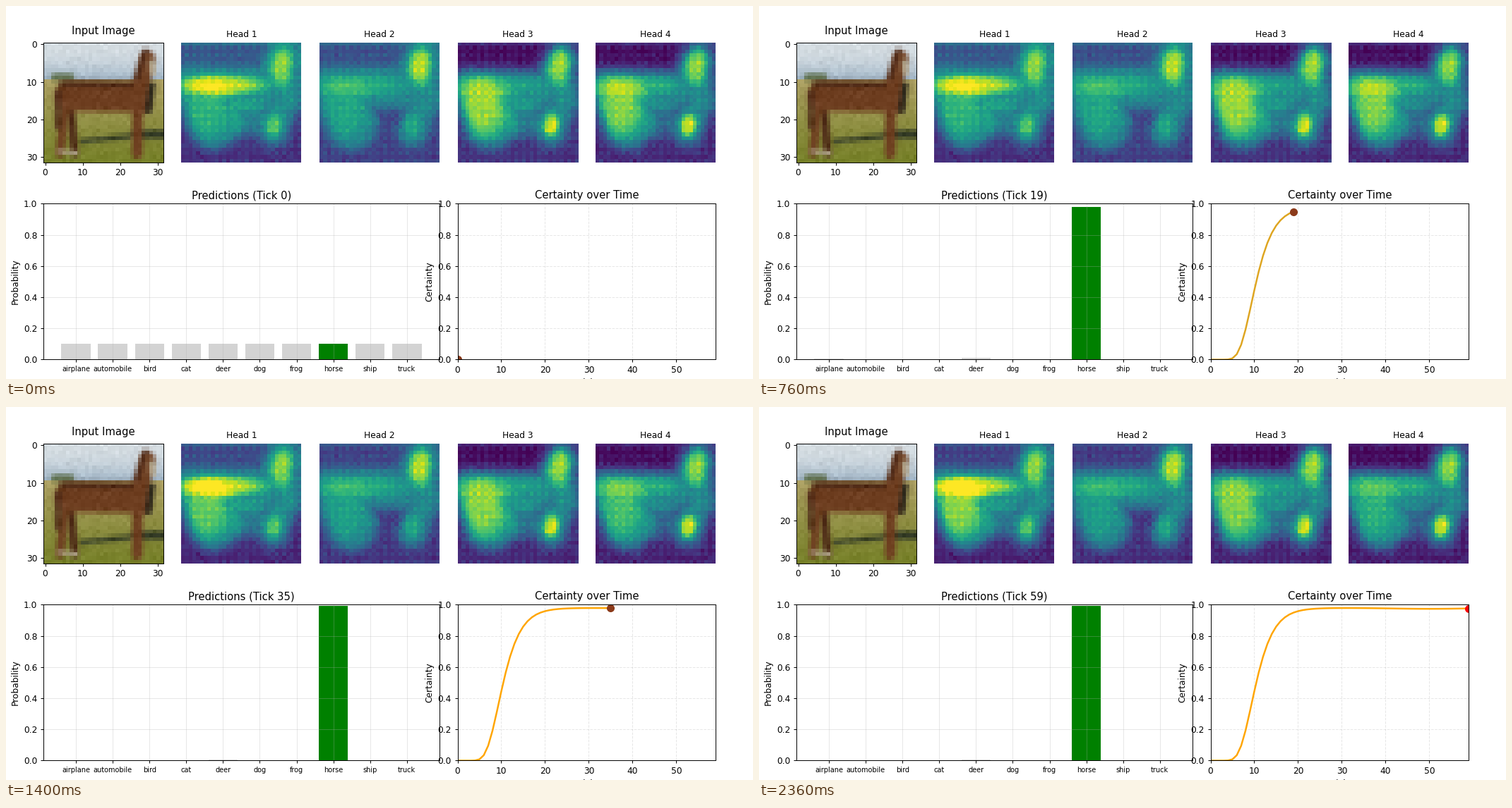
These frames come from a looping animation (1058x529 px, 2400 ms). A matplotlib script:

```python
import numpy as np
import matplotlib.pyplot as plt
from matplotlib.animation import FuncAnimation

TICKS = 60
N = 32
K = 23 / 24  # keeps type and line sizes right at 92 dpi

plt.rcParams.update({
    "font.family": "DejaVu Sans", "font.size": 10 * K,
    "axes.titlesize": 12 * K, "axes.titlepad": 6 * K, "axes.labelpad": 4 * K,
    "axes.linewidth": 0.8 * K, "grid.linewidth": 0.8 * K,
    **{f"{a}tick.major.{p}": v * K for a in "xy"
       for p, v in (("size", 3.5), ("pad", 3.5), ("width", 0.8))},
})

rows, cols = np.mgrid[0:N, 0:N].astype(float)


def dist(x0, y0, x1, y1, r):
    """Signed distance from every cell to a capsule."""
    dx, dy = x1 - x0, y1 - y0
    t = ((cols - x0) * dx + (rows - y0) * dy) / (dx * dx + dy * dy)
    t = np.clip(t, 0, 1)
    return np.hypot(cols - x0 - t * dx, rows - y0 - t * dy) - r


def soft(d, s):
    return 1 / (1 + np.exp(np.clip(d / s, -40, 40)))


def lobe(x, y, sx, sy):
    """Flat-topped bump."""
    return np.exp(-(((cols - x) / sx) ** 2 + ((rows - y) / sy) ** 2) ** 2)


# ---- input picture -------------------------------------------------------

def make_picture():
    brown, dark, black = (110, 62, 32), (76, 40, 22), (40, 36, 26)
    pale, shade = (178, 168, 142), (48, 56, 36)

    sky = np.array((212, 220, 225)) - rows[..., None] ** 2 * (0.6, 0.45, 0.3)
    depth = (rows[..., None] - 10) / 21
    field = np.array((172, 160, 98)) - depth * (54, 32, 58)
    img = np.where(rows[..., None] < 9.5, sky, field)

    def paint(color, *capsule, s=0.3):
        nonlocal img
        m = soft(dist(*capsule), s)[..., None]
        img = img * (1 - m) + np.array(color) * m

    paint((86, 104, 66), 2.5, 8.8, 6.5, 8.8, 0.9)
    paint(shade, 10, 25.8, 22, 24.6, 0.6)
    paint(shade, 24, 24, 31, 24, 1.1)
    paint(dark, 6.8, 18, 7.8, 29, 1.0)
    paint(brown, 5.2, 17, 3.9, 29, 1.1)
    paint(brown, 24.5, 15, 24.4, 29, 1.4)
    paint(brown, 6.5, 14, 23.5, 14.2, 3.9)
    paint(brown, 25, 12, 25.5, 16, 2.5)
    paint(dark, 4.5, 10.6, 23, 10.8, 0.7)
    paint(dark, 3.4, 13, 3.4, 22, 0.7)
    paint(brown, 27, 4, 25.4, 11, 2.1)
    paint(dark, 26.5, 2, 24.4, 9, 0.6)
    paint(pale, 28.2, 5, 28.5, 7.5, 0.8)
    paint(black, 28.3, 11, 27.4, 17.5, 0.8)
    paint(pale, 3.8, 28.5, 8, 29, 0.5)
    img += np.random.default_rng(4).normal(0, 4, (N, N, 1))
    return np.clip(img, 0, 255).astype(np.uint8)


# ---- attention heads -----------------------------------------------------

BODY = np.min([
    dist(2.5, 11.5, 22, 12, 3.8),     # trunk
    dist(6, 15, 8, 21, 5.5),          # haunch
    dist(24.5, 9, 27, 4.5, 3.5),      # neck
    dist(27, 9, 27.5, 15, 3),         # chest
    dist(27, 15, 24.3, 23, 2.6),      # foreleg
], axis=0)
INSIDE = soft(BODY, 0.7)
HALO = 0.2 * np.exp(-(np.clip(BODY, 0, None) / 2.2) ** 2)
BELLY = lobe(16, 19, 6.5, 6)
SPINE = lobe(10.5, 10.8, 11.5, 2.8)
REAR = lobe(5.5, 16.5, 7.5, 8.5)
CREST = lobe(26.3, 5.5, 3.2, 5.5)
KNEE = lobe(24, 21.5, 2.6, 3.2)
DOTS = 0.06 * ((cols % 2) * (rows % 2) - 0.25)
NOISE = np.random.default_rng(9).normal(0, 0.02, (4, N, N))

# drift is how far the focus on the rear grows or fades
HEADS = [
    dict(top=.28, low=.14, belly=.28, base=.50, spine=.42, rear=.15,
         crest=.33, knee=.26, drift=.18),
    dict(top=.25, low=.19, belly=.00, base=.48, spine=.14, rear=.12,
         crest=.42, knee=.14, drift=-.04),
    dict(top=.04, low=.15, belly=.26, base=.50, spine=.08, rear=.36,
         crest=.35, knee=.46, drift=-.04),
    dict(top=.04, low=.12, belly=.22, base=.48, spine=.16, rear=.34,
         crest=.36, knee=.48, drift=-.18),
]


def attention(h, tick):
    u = np.clip((tick - 14) / 36, 0, 1)
    u = u * u * (3 - 2 * u)
    a = HEADS[h]
    ground = a["low"] + (a["top"] - a["low"]) * soft(rows - 13, 2.5)
    ground = (ground + 0.1 * (rows == 0)) * (1 - 0.3 * u)
    ground = ground + HALO + a["belly"] * BELLY
    focus = (a["base"] + a["spine"] * SPINE + a["crest"] * CREST
             + a["knee"] * KNEE + (a["rear"] + a["drift"] * u) * REAR)
    return ground + (focus - ground) * INSIDE + NOISE[h] + DOTS


# ---- predictions and certainty -------------------------------------------

# pull of each class on the probability left over
PULL = dict(airplane=75, automobile=12, bird=22, cat=12, deer=88,
            dog=20, frog=3, horse=0, ship=3, truck=15)
LABELS = list(PULL)
TRUE = LABELS.index("horse")


def gompertz(t, rate, mid):
    return np.exp(-np.exp(-rate * (t - mid)))


def probs(tick):
    p_true = 0.1 + 0.893 * gompertz(tick, 0.391, 8.19)
    w = (np.array(list(PULL.values())) / 88) ** ((tick / 11) ** 2)
    w[TRUE] = 0
    p = (1 - p_true) * w / w.sum()
    p[TRUE] = p_true
    return p


ticks = np.arange(TICKS)
certainty = (0.98 * gompertz(ticks, 0.36, 9.35)
             - 0.006 * np.exp(-((ticks - 50) / 12) ** 2))

# ---- stage ---------------------------------------------------------------

fig = plt.figure(figsize=(11.5, 5.75), dpi=92, facecolor="white")
gs = fig.add_gridspec(2, 5, left=0.05, right=0.95, top=0.902, bottom=0.052,
                      wspace=0.15, hspace=0.3, height_ratios=[1, 1.3])

ax_in = fig.add_subplot(gs[0, 0])
ax_in.imshow(make_picture(), interpolation="nearest")
ax_in.set_title("Input Image", pad=10 * K)
ax_in.set_xticks(range(0, 31, 10))
ax_in.set_yticks(range(0, 31, 10))

maps = []
for h in range(4):
    ax = fig.add_subplot(gs[0, h + 1])
    maps.append(ax.imshow(attention(h, 0), cmap="viridis", vmin=0, vmax=1,
                          interpolation="nearest"))
    ax.set_title(f"Head {h + 1}", fontsize=10 * K)
    ax.axis("off")

ax_bar = fig.add_subplot(gs[1, :3])
bars = ax_bar.bar(range(10), probs(0), color="lightgray")
bars[TRUE].set_facecolor("green")
ax_bar.set_xlim(-0.89, 9.89)
ax_bar.set_xticks(range(10), LABELS, fontsize=8 * K)
ax_bar.set_ylabel("Probability")
ax_bar.grid(alpha=0.3)

ax_cer = fig.add_subplot(gs[1, 3:])
line, = ax_cer.plot([], [], lw=2 * K)
dot, = ax_cer.plot([], [], "o", ms=8 * K)
ax_cer.set_xlim(0, TICKS - 1)
ax_cer.set_xticks(range(0, 51, 10))
ax_cer.set_title("Certainty over Time")
ax_cer.set_xlabel("Tick")
ax_cer.set_ylabel("Certainty")
ax_cer.grid(alpha=0.3, linestyle="--")

for ax in (ax_bar, ax_cer):
    ax.set_ylim(0, 1)
    ax.set_yticks(np.linspace(0, 1, 6))


def update(tick):
    for h, im in enumerate(maps):
        im.set_data(attention(h, tick))
    for bar, p in zip(bars, probs(tick)):
        bar.set_height(p)
    ax_bar.set_title(f"Predictions (Tick {tick})")
    line.set_data(ticks[:tick + 1], certainty[:tick + 1])
    line.set_color("#efdc22" if tick < 15 else
                   "#dea520" if tick < 30 else "orange")
    dot.set_data([tick], [certainty[tick]])
    dot.set_color("#8b3a1a" if tick < 42 else "red")
    return [*maps, *bars, line, dot]


anim = FuncAnimation(fig, update, frames=TICKS, interval=40,
                     repeat=True, repeat_delay=0, blit=False)
plt.show()
```
